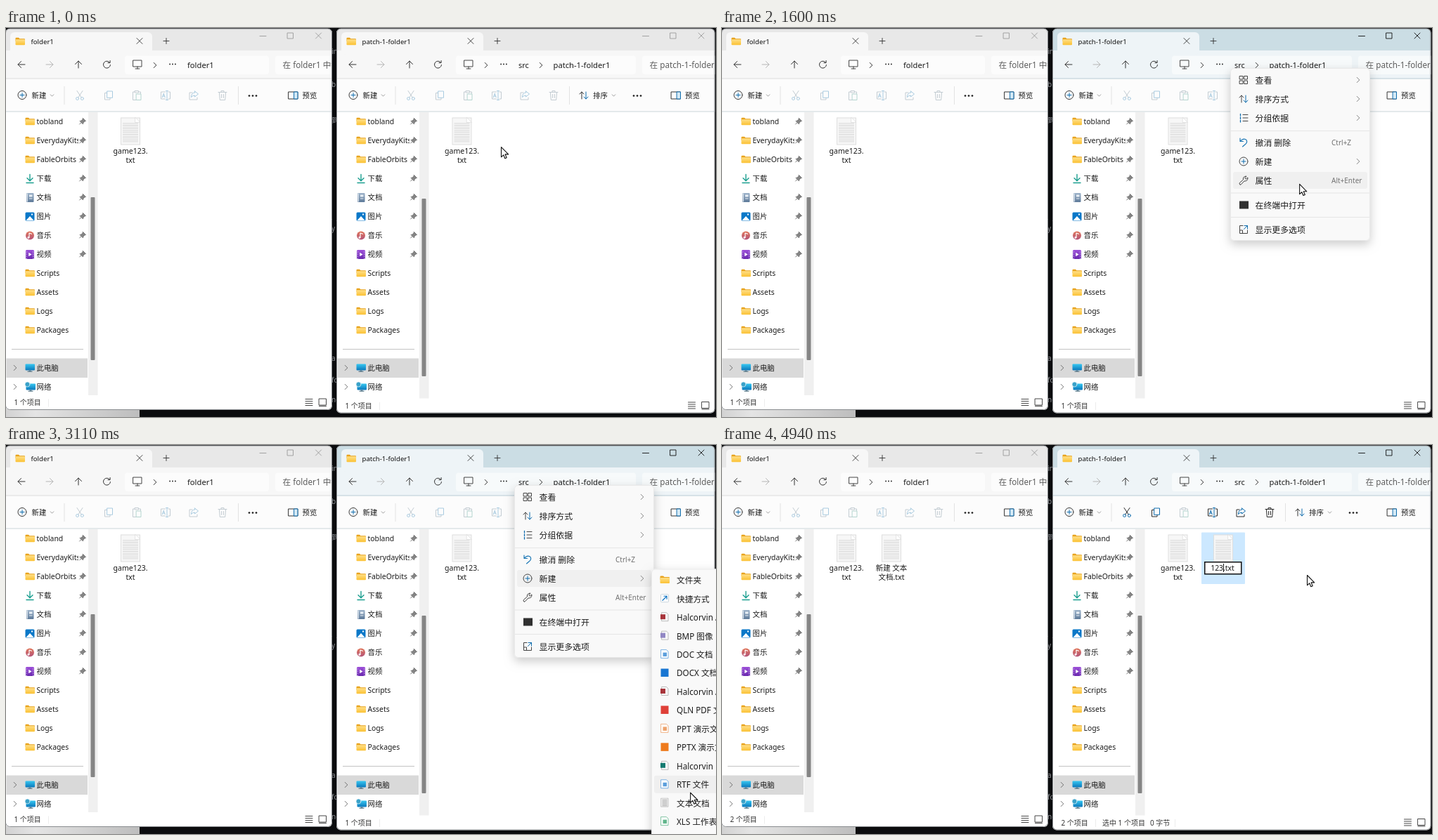
Animation, 1010 px wide and 554 px high, one loop 5.04 s. Source, as an HTML page with a canvas:

```html
<!DOCTYPE html>
<html lang="zh">
<head>
<meta charset="utf-8">
<style>
html,body{margin:0;width:100%;height:100%;overflow:hidden;background:#0b0c0e}
canvas{display:block;width:1010px;height:554px}
</style>
</head>
<body>
<canvas id="c" width="1010" height="554"></canvas>
<script>
const g = document.getElementById('c').getContext('2d');
const LOOP = 5040;
const FONT = '"Noto Sans","Noto Sans CJK SC","Noto Sans CJK",sans-serif';

const clamp = v => Math.max(0, Math.min(1, v));
const ramp = (t, a, b) => clamp((t - a) / (b - a));
const easeOut = p => 1 - (1 - p) ** 3;
const mix = (a, b, p) => `rgb(${a.map((v, i) => v + (b[i] - v) * p).join()})`;

function text(s, x, y, size = 10.4, col = '#1b1b1b', align = 'left', weight = 400) {
  g.font = `${weight} ${size}px ${FONT}`;
  g.textAlign = align;
  g.fillStyle = col;
  g.fillText(s, x, y + size * 0.38);
}
function rect(x, y, w, h, col) {
  g.fillStyle = col;
  g.fillRect(x, y, w, h);
}
function round(x, y, w, h, r, fill, line) {
  g.beginPath();
  g.roundRect(x, y, w, h, r);
  if (fill) { g.fillStyle = fill; g.fill(); }
  if (line) { g.strokeStyle = line; g.lineWidth = 1; g.stroke(); }
}
function draw(d, x, y, line, width = 1, fill) {
  g.save();
  g.translate(x, y);
  const p = new Path2D(d);
  if (fill) { g.fillStyle = fill; g.fill(p); }
  if (line) {
    g.lineWidth = width;
    g.lineCap = g.lineJoin = 'round';
    g.strokeStyle = line;
    g.stroke(p);
  }
  g.restore();
}
function dots(x, y, gap, r) {
  g.fillStyle = '#1b1b1b';
  for (let i = -1; i < 2; i++) {
    g.beginPath();
    g.arc(x + i * gap, y, r, 0, 7);
    g.fill();
  }
}
function gradient(y0, y1, a, b) {
  const k = g.createLinearGradient(0, y0, 0, y1);
  k.addColorStop(0, a);
  k.addColorStop(1, b);
  return k;
}

const P = {
  back: 'M5 0H-5M-.5 -4.5L-5 0L-.5 4.5',
  forward: 'M-5 0H5M.5 -4.5L5 0L.5 4.5',
  up: 'M0 5V-5M-4.5 -.5L0 -5L4.5 -.5',
  reload: 'M4.2 -2.6A5 5 0 1 0 5 .5M4.6 -5.5V-2.4H1.5',
  close: 'M-4 -4L4 4M4 -4L-4 4',
  plus: 'M-4 0H4M0 -4V4',
  right: 'M-1.8 -3.6L1.8 0L-1.8 3.6',
  down: 'M-2.3 -1.2L0 1.2L2.3 -1.2',
  screen: 'M-6 -6H6V3H-6ZM-3 6H3M0 3V6',
  ring: 'M6 0A6 6 0 1 1 -6 0A6 6 0 1 1 6 0',
  cutBlades: 'M-4 -6.5L2.3 3M4 -6.5L-2.3 3',
  cutRings: 'M-1.4 4.5A2 2 0 1 1 -5.4 4.5A2 2 0 1 1 -1.4 4.5M5.4 4.5A2 2 0 1 1 1.4 4.5A2 2 0 1 1 5.4 4.5',
  copyBack: 'M-2.2 -3.5H-5.5V6H2V3.5',
  copyFront: 'M-2 -6H5.5V3.3H-2Z',
  pasteBoard: 'M-3 -5H-5.5V6.5H-1M3 -5H5.5V-2.5M-2.5 -6.5H2.5V-4H-2.5Z',
  pastePage: 'M-.5 -2H6V6.5H-.5Z',
  nameBox: 'M-.5 -5H-6.5V5H-.5M4 -5H6.5V5H4',
  nameMark: 'M2 -6.5V6.5M.5 -6.5H3.5M.5 6.5H3.5M-4.6 2.8L-2.7 -2.8L-.8 2.8M-4 1H-1.4',
  shareBox: 'M-2 -4H-6V6H5V3',
  shareArrow: 'M1.5 -6L6.5 -2L1.5 2V0Q-2 0 -3.5 2.8Q-3.5 -4 1.5 -4Z',
  bin: 'M-6 -4.5H6M-4.6 -4.5L-3.7 6.5H3.7L4.6 -4.5M-2 -4.5V-6.5H2V-4.5M-1.4 -1.5V3.5M1.4 -1.5V3.5',
  pane: 'M-6.5 -5H6.5V5H-6.5Z',
  paneSide: 'M1.5 -5H6.5V5H1.5Z',
  sortUp: 'M-3 5V-5M-6 -2L-3 -5L0 -2',
  sortDown: 'M3 -5V5M0 2L3 5L6 2',
  pin: 'M.5 -4.5L4.5 -.5L2.8 0L.8 2.2L.6 4L-4 -.6L-2.2 -.8L0 -2.8ZM-2 1.6L-4.3 4',
  arrow: 'M0 0V14.3L3.2 11.3L5.3 16.2L7.7 15.2L5.6 10.4H10.2Z',
  grid: 'M-5.5 -5.5H-1V-1H-5.5ZM1 -5.5H5.5V-1H1ZM-5.5 1H-1V5.5H-5.5ZM1 1H5.5V5.5H1Z',
  list: 'M-2 -4.5H5M-2 0H5M-2 4.5H5',
  steps: 'M-5.5 -5.5V-3M-5.5 -1V1.5M-5.5 3.5V6',
  undo: 'M-5 -6V-1.5H-.5M-5 -1.5Q0 -7 4 -3.5Q6 0 2 3L-1.5 6',
  wrench: 'M-5 6Q-7 5 -5.5 3.3L-.5 -1Q-1.5 -5.5 4 -6L1.8 -3.2L3.2 -1.8L6 -4Q6 1.5 1 1L-3.6 5.8Q-4.3 6.4 -5 6Z',
  more: 'M-1 -5.5H-5.5V5.5H5.5V1M-5.5 1H-1.5V5.5',
  moreArrow: 'M1 -5.5H5.5V-1M5.5 -5.5L.5 -.5'
};

function folder(x, y) {
  draw('M-6.5 -4.2Q-6.5 -5.2 -5.5 -5.2H-2L-.5 -3.7H6Q7 -3.7 7 -2.7V0H-6.5Z', x, y, null, 1, '#e8a31d');
  round(x - 6.5, y - 2.7, 13.5, 8, 1, gradient(y - 3, y + 5, '#ffe08a', '#fbc236'));
}
function page(x, y) {
  rect(x - 14, y - 19.5, 28, 39, '#dedede');
  rect(x - 13, y - 18.5, 26, 37, '#f7f7f7');
  for (let i = 0; i < 11; i++) rect(x - 11, y - 11.5 + i * 2.6, 22, 0.8, '#cdcdcd');
  draw('M7 -19.5L14 -12.5H7Z', x, y, '#dcdcdc', 0.7, '#fff');
}
function pc(x, y) {
  round(x - 6.5, y - 5.5, 13.5, 9, 1, gradient(y - 5, y + 4, '#35c3ee', '#0873b8'));
  rect(x - 1.5, y + 3.5, 3, 1.5, '#5c7e91');
  rect(x - 3.5, y + 4.7, 7, 1, '#476a7d');
}
const place = [
  (x, y) => draw('M0 -6V3M-4 -.8L0 3.2L4 -.8M-5 6H5', x, y, '#1a9e8f', 1.4),
  (x, y) => {
    round(x - 5, y - 6.5, 10.5, 13, 1, gradient(y - 6, y + 6, '#9bb1c8', '#607c9b'));
    rect(x - 4.5, y - 6, 1.5, 12, '#d6e0ea');
    rect(x - 1, y - 4, 4.5, 3, '#e9f0f6');
    rect(x - 1, y + 1, 4.5, 1, '#e9f0f6');
  },
  (x, y) => {
    round(x - 6.5, y - 6, 13, 12, 1.5, '#0b78c8');
    draw('M-5.5 5.5L0 -.5L5.5 5.5Z', x, y, null, 1, '#fff');
    rect(x + 2, y - 4, 2, 2, '#fff');
  },
  (x, y) => {
    draw(P.ring, x, y, null, 1, gradient(-6, 6, '#e1785c', '#b35479'));
    draw('M-1 3V-3.5L2.5 -2.3', x, y, '#fff', 1.2);
    draw('M-.7 3A1.4 1.4 0 1 1 -3.5 3A1.4 1.4 0 1 1 -.7 3', x, y, null, 1, '#fff');
  },
  (x, y) => {
    round(x - 6, y - 6.5, 12, 13, 1.5, gradient(y - 6, y + 6, '#9c4fd8', '#6b2bb0'));
    for (let i = -4; i < 6; i += 3) {
      rect(x - 5.2, y + i, 1.2, 1.2, '#dcc2f3');
      rect(x + 4, y + i, 1.2, 1.2, '#dcc2f3');
    }
    draw('M-1.8 -2.7L2.6 0L-1.8 2.7Z', x, y, null, 1, '#fff');
  }
];
const rows = ['tobland', 'EverydayKits', 'FableOrbits', '下载', '文档', '图片', '音乐', '视频',
  'Scripts', 'Assets', 'Logs', 'Packages'];

function sidebar(x, bottom, thumb) {
  rect(x + 117, 120, 13.5, bottom - 141, '#f0f0f0');
  round(x + 120.5, thumb[0], 6, thumb[1] - thumb[0], 1, '#858585');
  rows.forEach((s, i) => {
    const y = 133 + i * 27;
    if (i > 2 && i < 8) place[i - 3](x + 34, y + 0.5);
    else folder(x + 34, y);
    g.save();
    g.beginPath();
    g.rect(x + 40, y - 10, i < 8 ? 63 : 75, 20);
    g.clip();
    text(s, x + 43.5, y);
    g.restore();
    if (i < 8) draw(P.pin, x + 109, y, '#777', 1, '#858585');
  });
  rect(x + 8, 457, 102, 1, '#c3c3c3');
  rect(x + 0.5, 470.5, 115.5, 27.5, '#d9d9d9');
  [484, 511].forEach((y, i) => {
    draw(P.right, x + 13, y, '#666', 0.9);
    pc(x + 34 + i, y + i);
    text(i ? '网络' : '此电脑', x + 43.5, y);
  });
  draw('M3 0A3.5 3.5 0 1 1 -4 0A3.5 3.5 0 1 1 3 0', x + 31, 507.5, '#eef8fc', 0.7, '#3aa2c9');
}

function toolbar(x, r, wide, on) {
  const ink = on ? '#2a2a2a' : '#c3ccd2', hue = on ? '#0f6cad' : '#a9cbe0';
  const off = '#c3ccd2', offHue = '#b4d5cf';
  draw(P.ring, x + 23, 95.5, '#333');
  draw('M-3 0H3M0 -3V3', x + 23, 95.5, '#0f6cad');
  text('新建', x + 36.5, 96);
  draw(P.down, x + 65.5, 96, '#888', 0.8);
  rect(x + 82.5, 83, 1, 26, '#e2e2e2');
  draw(P.cutBlades, x + 105, 96, ink);
  draw(P.cutRings, x + 105, 96, hue);
  draw(P.copyBack, x + 146, 96, ink);
  draw(P.copyFront, x + 146, 96, hue);
  draw(P.pasteBoard, x + 186, 96, off);
  draw(P.pastePage, x + 186, 96, offHue);
  draw(P.nameBox, x + 227, 96, ink);
  draw(P.nameMark, x + 227, 96, hue);
  draw(P.shareBox, x + 267, 96, ink);
  draw(P.shareArrow, x + 267, 96, hue);
  draw(P.bin, x + 308, 96, ink);
  rect(x + 330, 83, 1, 26, '#e2e2e2');
  if (wide) {
    draw(P.sortUp, x + 351, 96, '#333');
    draw(P.sortDown, x + 351, 96, '#0f6cad');
    text('排序', x + 364, 96);
    draw(P.down, x + 393.5, 96, '#888', 0.8);
  }
  dots(wide ? x + 427 : x + 351, 96.5, 5, 1.35);
  draw(P.pane, r - 55.5, 96, '#333');
  draw(P.paneSide, r - 55.5, 96, '#0f6cad', 1, '#d5eaf6');
  text('预览', r - 42.5, 96);
}

function frame(x, w, bottom, name, active, buttons, wide, on, thumb, status) {
  const r = x + w;
  g.save();
  g.beginPath();
  g.roundRect(x - 1, 1, w + 1, bottom - 1, 6);
  g.clip();
  rect(x - 1, 1, w + 1, bottom, '#fff');
  rect(x - 1, 1, w + 1, 32, mix([232, 232, 232], [203, 221, 228], active));
  const nav = mix([247, 247, 247], [238, 244, 247], active);
  const field = mix([252, 252, 252], [247, 250, 251], active);
  rect(x - 1, 32, w + 1, 40, nav);
  round(x + 6, 6, 202, 32, 6, nav);
  folder(x + 20, 19);
  text(name, x + 35.5, 19, 9.6, '#111', 'left', 500);
  draw(P.close, x + 190, 18.5, '#333', 0.9);
  draw(P.plus, x + 228, 18.5, '#333', 0.9);
  draw('M-4.5 0H4.5', r - 98.5, 11.5, buttons, 0.9);
  draw('M-4 -4H4V4H-4Z', r - 59.5, 11, buttons, 0.9);
  draw(P.close, r - 19.5, 11, buttons, 0.9);

  draw(P.back, x + 22, 52, '#333');
  draw(P.forward, x + 62, 52, '#b5b5b5');
  draw(P.up, x + 103, 52, '#333');
  draw(P.reload, x + 143.5, 52, '#333');
  const end = wide ? 425 : 374;
  round(x + 169, 39.5, end - 169, 26.5, 4, field);
  round(x + end + 9, 39.5, 200, 26.5, 4, field);
  draw(P.screen, x + 187, 52, '#444');
  draw(P.right, x + 212, 53, '#333');
  dots(x + 237, 51.5, 3.9, 0.9);
  if (wide) {
    text('src', x + 258, 52.5, 11);
    draw(P.right, x + 290, 53, '#333');
  }
  text(name, x + (wide ? 307.5 : 258), 52.5, 11.2);
  text(`在 ${name} 中搜索`, x + end + 19.5, 52.5, 11.7, '#5e5e5e');

  rect(x - 1, 72, w + 1, 47, '#fcfcfc');
  rect(x - 1, 71.5, w + 1, 1, mix([221, 221, 221], [186, 205, 213], active));
  rect(x - 1, 118.5, w + 1, 1, '#cbd5d9');
  toolbar(x, r, wide, on);
  sidebar(x, bottom, thumb);

  const y = bottom - 10.5;
  text(status, x + 11.5, y, 10, '#333');
  rect(x + 60, y - 5, 1, 11, '#ececec');
  draw('M-5 -4.5H5M-5 -1.5H5M-5 1.5H5M-5 4.5H5', r - 33, y - 0.5, '#333', 0.9);
  draw('M-5 -5H5V4H-5ZM-5 5.5H5', r - 13.5, y - 0.5, '#333', 0.9);
  g.restore();
  round(x - 0.5, 1, w, bottom - 1.5, 6, null, '#8a8d90');
}

function file(x, a, b) {
  page(x, 147);
  text(a, x, 175, 10.5, '#1b1b1b', 'center');
  text(b, x, 188, 10.5, '#1b1b1b', 'center');
}

function renaming(t) {
  round(682, 124.5, 62, 73.5, 1, '#cce8ff');
  page(713, 147);
  const typed = '123'.slice(0, t < 4710 ? 0 : t < 4790 ? 1 : t < 4880 ? 2 : 3);
  const h = typed ? 17 : 31;
  rect(686, 166, 53.5, h + 1.5, '#111');
  rect(687.5, 167.5, 50.5, h - 1.5, '#fff');
  if (typed) {
    text(typed + '.txt', 712, 175, 10.4, '#1b1b1b', 'center');
    const full = g.measureText(typed + '.txt').width;
    rect(712 - full / 2 + g.measureText(typed).width, 169, 1, 12, '#111');
  } else {
    rect(690, 169, 45, 13, '#0a6fc9');
    rect(694, 182, 21, 13, '#0a6fc9');
    text('新建 文本', 712.5, 175, 10.4, '#fff', 'center');
    text('文档', 694, 188, 10.4, '#fff');
    text('.txt', 715, 188);
  }
}

function panel(x, y, w, h) {
  g.save();
  g.shadowColor = 'rgba(0,0,0,.2)';
  g.shadowBlur = 14;
  g.shadowOffsetY = 5;
  round(x, y, w, h, 5, '#f9f9f9');
  g.restore();
  round(x + 0.5, y + 0.5, w - 1, h - 1, 5, null, '#e9e9e9');
}

const menuRows = [
  [74, '查看', y => draw(P.grid, 742, y, '#444')],
  [101, '排序方式', y => { draw(P.sortUp, 742, y, '#444'); draw(P.sortDown, 742, y, '#0f6cad'); }],
  [128, '分组依据', y => { draw(P.list, 743, y, '#444'); draw(P.steps, 743, y, '#0f6cad', 1.3); }],
  [163, '撤消 删除', y => draw(P.undo, 742, y, '#1673b3', 1.1), 'Ctrl+Z'],
  [190, '新建', y => { draw(P.ring, 742, y, '#444'); draw('M-3 0H3M0 -3V3', 742, y, '#0f6cad'); }],
  [217, '属性', y => draw(P.wrench, 742, y, '#444'), 'Alt+Enter'],
  [252, '在终端中打开', y => rect(736, y - 5.5, 13, 11, '#303030')],
  [287, '显示更多选项', y => { draw(P.more, 742, y, '#444'); draw(P.moreArrow, 742, y, '#0f6cad'); }]
];

function menu(t, hover) {
  const p = easeOut(ramp(t, 1300, 1460));
  const dy = 80 * (1 - p);
  g.save();
  g.globalAlpha = p * (1 - ramp(t, 3620, 3720));
  panel(723, 57 + dy, 199, 246 - dy);
  g.beginPath();
  g.rect(723, 57, 199, 246);
  g.clip();
  g.translate(0, dy);
  menuRows.forEach(([y, label, icon, key], i) => {
    if (i === hover) round(727, y - 12, 191, 24, 3, '#f0f0f0');
    icon(y);
    text(label, 758.5, y + 0.5, 11.9);
    if (key) text(key, 867, y, 10, '#727272');
    else if (i < 5) draw(P.right, 905, y, '#777', 0.9);
  });
  [146, 234.5, 269].forEach(y => rect(724, y, 197, 1, '#e6e6e6'));
  g.restore();
}

// File type icons: a solid square, an outlined page, a page with a tag, or lines of writing.
const solid = hue => (x, y) => rect(x - 5.5, y - 5.5, 11, 11.5, hue);
const outline = hue => (x, y) => {
  draw('M-5 -6H2.5L5 -3.5V6H-5Z', x, y, hue, 0.8, '#fff');
  rect(x - 2.5, y - 2, 5.5, 5.5, hue);
};
const tagged = hue => (x, y) => {
  draw('M-4 -6H2.5L5 -3.5V6H-4Z', x, y, '#aaa', 0.8, '#fafafa');
  rect(x - 6, y - 3.5, 7, 7, hue);
};
const written = (x, y) => {
  draw('M-5 -6H5V6H-5Z', x, y, '#bbb', 0.8, '#eee');
  for (let i = -4; i < 5; i += 2) rect(x - 3.5, y + i, 7, 0.9, '#aaa');
};
const link = (x, y) => {
  round(x - 5.5, y - 5.5, 11, 11, 1, '#fff', '#c9d5dd');
  draw('M-3 3L3 -3M-1 -3H3V1', x, y, '#1376c4', 1.2);
};
const kinds = [
  ['文件夹', folder], ['快捷方式', link], ['Halcorvin Archive', tagged('#a8353b')],
  ['BMP 图像', tagged('#9187c4')], ['DOC 文档', outline('#5c9fdc')], ['DOCX 文档', solid('#1976d2')],
  ['Halcorvin Atlas', tagged('#a8353b')], ['QLN PDF 文档', solid('#df4038')],
  ['PPT 演示文稿', outline('#eda36c')], ['PPTX 演示文稿', solid('#ee7a1c')],
  ['Halcorvin Press', tagged('#127a70')], ['RTF 文件', outline('#5c9fdc')], ['文本文档', written],
  ['XLS 工作表', outline('#62b68c')], ['XLSX 工作表', solid('#22a066')],
  ['572打包 ZIP 文件', solid('#2b87d3')]
];
const GAP = 26.45;

function submenu(t, hover) {
  const dy = -213 * (1 - easeOut(ramp(t, 2280, 2530)));
  panel(918, 176.5, 180, 427.5 + dy);
  g.save();
  g.beginPath();
  g.rect(918, 177, 92, 426 + dy);
  g.clip();
  g.translate(0, dy);
  kinds.forEach(([label, icon], i) => {
    const y = 192.3 + i * GAP;
    if (i === hover) round(922, y - 12.5, 172, 25, 3, '#efefef');
    icon(937, y - 0.5);
    text(label, 954, y + 0.5, 11.7);
  });
  g.restore();
}

const path = [
  [0, 704, 169], [50, 704, 170], [150, 713, 190], [280, 732, 236], [470, 723, 264], [1400, 723, 264],
  [1600, 821, 222], [1840, 855, 194], [1930, 855, 201], [2070, 855, 201], [2200, 855, 190],
  [2370, 855, 190], [2540, 999, 208], [2640, 999, 212], [3150, 971, 518], [3200, 971, 518],
  [3250, 971, 514], [3660, 971, 514], [4090, 832, 235], [4300, 832, 185], [LOOP, 832, 185]
];
function pointer(t) {
  const i = path.findIndex(k => k[0] > t);
  const [a, x0, y0] = path[i - 1], [b, x1, y1] = path[i];
  const p = ramp(t, a, b);
  return [x0 + (x1 - x0) * p, y0 + (y1 - y0) * p];
}

function backdrop() {
  rect(0, 0, 1010, 554, '#0b0c0e');
  const k = g.createLinearGradient(0, 0, 190, 0);
  k.addColorStop(0, '#d2d2d2');
  k.addColorStop(0.22, '#e4e4e4');
  k.addColorStop(1, '#bdbdbd');
  rect(0, 540, 190, 14, k);
  [[33, 'in'], [80, 'bi'], [131, '到'], [285, 'y'], [470, 'a'], [501, 'fo'], [529, 'ne']]
    .forEach(([y, s]) => text(s, 463, y, 10, '#8f9297'));
}

function render(t) {
  const [mx, my] = pointer(t);
  const made = t >= 3900, shared = t >= 4020;
  backdrop();

  frame(0, 464, 544, 'folder1', 0, '#9a9a9a', false, false, [241, 473], `${shared ? 2 : 1} 个项目`);
  file(177, 'game123.', 'txt');
  if (shared) file(241, '新建 文本', '文档.txt');

  frame(471, 537.5, 548.5, 'patch-1-folder1', ramp(t, 670, 880), t < 660 ? '#9a9a9a' : '#111',
    true, made, [243, 496], `${made ? 2 : 1} 个项目`);
  if (t >= 660 && t < 860) round(617.5, 124.5, 62, 73, 1, '#fff', '#c4d2da');
  file(648.5, 'game123.', 'txt');
  if (made) {
    renaming(t);
    text('选中 1 个项目', 541, 538, 10, '#333');
    text('0 字节', 609, 538, 10, '#333');
    rect(644, 533, 1, 11, '#ececec');
  }

  const open = t >= 2280 && t < 3580;
  if (t >= 1320 && t < 3720) {
    const over = menuRows.findIndex(([y]) => Math.abs(my + 1 - y) < 13.5);
    menu(t, t >= 1930 ? 4 : mx > 727 ? over : -1);
  }
  if (open) submenu(t, mx > 920 ? Math.floor((my - 4 - 179) / GAP) : -1);
  draw(P.arrow, mx + 0.5, my + 0.5, '#111', 1.1, '#fff');
}

function tick(now) {
  render(now % LOOP);
  requestAnimationFrame(tick);
}
requestAnimationFrame(tick);
</script>
</body>
</html>
```
